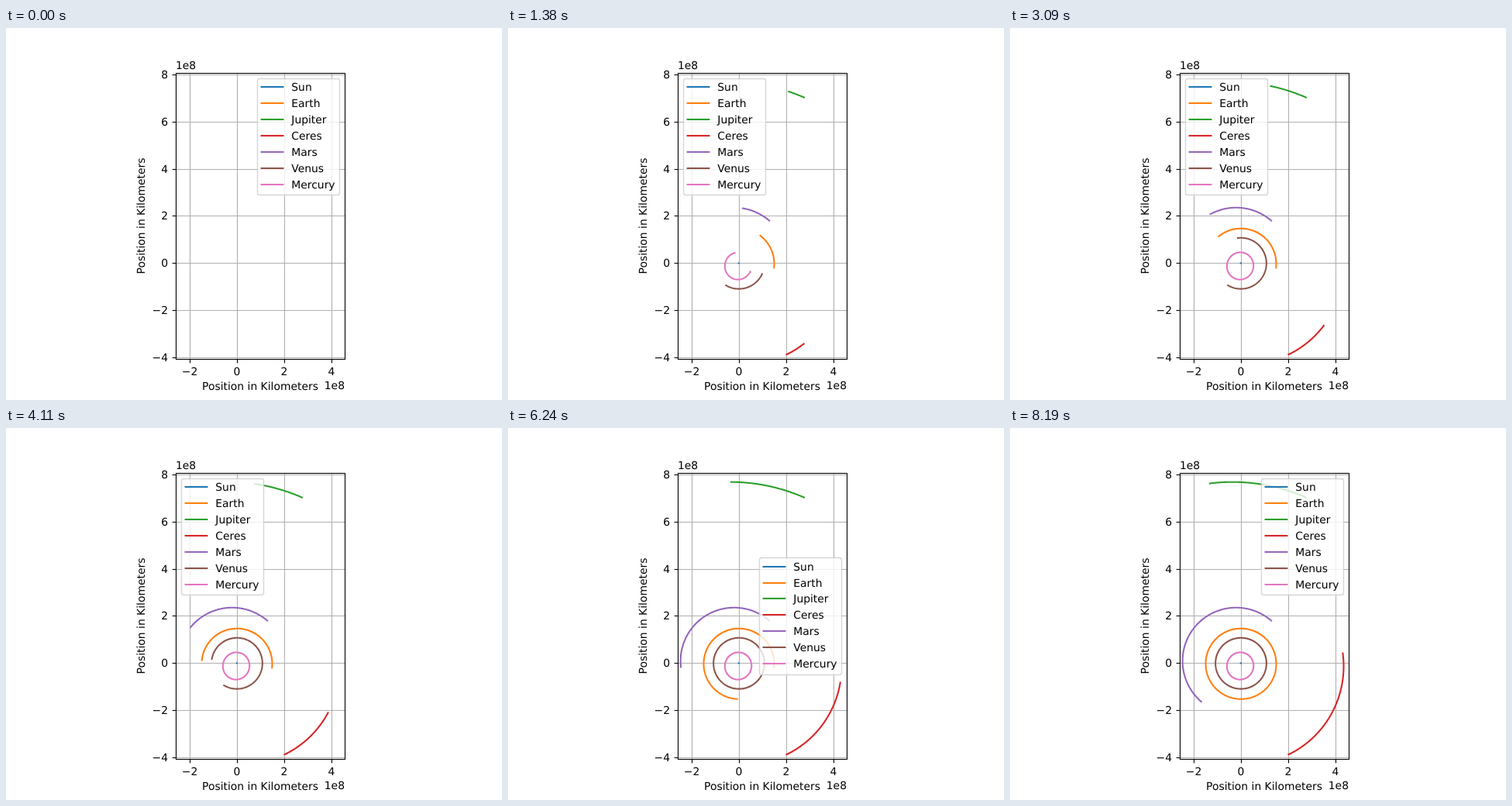
Write an HTML page that moves like this. It is 640 px wide and 480 px high and loops after 8220 ms.

```html
<!DOCTYPE html>
<html lang="en">
<head>
<meta charset="utf-8">
<title>Planet orbits</title>
<style>
  html, body { margin: 0; width: 100%; height: 100%; overflow: hidden; background: #fff; }
  svg { display: block; }
  text { font: 13.89px "DejaVu Sans", sans-serif; fill: #000; text-rendering: geometricPrecision; }
  .grid { stroke: #b0b0b0; stroke-width: 1.11; }
  .axis { stroke: #000; stroke-width: 1.11; fill: none; }
  .trace { fill: none; stroke-width: 2.083; stroke-linecap: square; stroke-linejoin: round; }
</style>
</head>
<body>
<svg id="stage" width="640" height="480" viewBox="0 0 640 480"></svg>
<script>
const STEP_MS = 30, STEPS = 274, DAYS_PER_STEP = 1.335;
const SCALE = 30.44, X0 = 298.1, Y0 = 303.3;   // pixels per 1e8 km, zero point
const AU = 1.495979;                           // in 1e8 km
const BOX = { left: 219.5, right: 437.5, top: 58.5, bottom: 427.5 };
const RAD = Math.PI / 180;

// Angles in degrees: inclination, node, perihelion longitude, mean longitude at start, daily motion.
const BODIES = [
  { name: "Sun", color: "#1f77b4", first: 45 },
  { name: "Earth", color: "#ff7f0e", orbit: [1, 0.0167, 0, 0, 102.94, 354.4, 0.985609] },
  { name: "Jupiter", color: "#2ca02c", orbit: [5.2045, 0.0484, 1.304, 100.47, 14.73, 64.13, 0.0830853] },
  { name: "Ceres", color: "#d62728", orbit: [2.7672, 0.0789, 10.587, 80.25, 153.67, 292.58, 0.21411] },
  { name: "Mars", color: "#9467bd", orbit: [1.52368, 0.0934, 1.85, 49.56, 336.06, 44.05, 0.5240208] },
  { name: "Venus", color: "#8c564b", orbit: [0.72333, 0.00678, 3.395, 76.68, 131.6, 239.12, 1.6021302] },
  { name: "Mercury", color: "#e377c2", orbit: [0.3871, 0.20563, 7.005, 48.33, 77.46, 100.25, 4.0923344] },
];

// Legend corner by step.
const LEGEND = [
  { from: 0, x: 324, top: 64.54 },
  { from: 1, x: 226, top: 64.54 },
  { from: 207, x: 324, top: 167.01 },
  { from: 263, x: 324, top: 64.54 },
];

const stage = document.getElementById("stage");

function add(tag, attrs, parent = stage) {
  const el = document.createElementNS("http://www.w3.org/2000/svg", tag);
  for (const key in attrs) el.setAttribute(key, attrs[key]);
  parent.appendChild(el);
  return el;
}

function label(str, x, y, anchor = "start", extra = {}, parent = stage) {
  add("text", { x, y, "text-anchor": anchor, ...extra }, parent).textContent = str;
}

const line = (cls, x1, y1, x2, y2) => add("line", { class: cls, x1, y1, x2, y2 });

// Heliocentric ecliptic position in 1e8 km.
function helio([a, e, inc, node, peri, mean, rate], day) {
  const M = (mean + rate * day - peri) * RAD;
  let E = M;
  for (let i = 0; i < 8; i++) E -= (E - e * Math.sin(E) - M) / (1 - e * Math.cos(E));
  const px = a * (Math.cos(E) - e);
  const py = a * Math.sqrt(1 - e * e) * Math.sin(E);
  const u = Math.atan2(py, px) + (peri - node) * RAD;
  const r = Math.hypot(px, py) * AU;
  const cn = Math.cos(node * RAD), sn = Math.sin(node * RAD);
  const along = r * Math.cos(u), across = r * Math.sin(u) * Math.cos(inc * RAD);
  return [cn * along - sn * across, sn * along + cn * across];
}

// The Sun's small swing about the centre of mass.
function sunAt(day) {
  const [x, y] = helio(BODIES[2].orbit, day);
  return [-x / 1047 - 0.0071, -y / 1047 + 0.0002];
}

function plot(body, step) {
  const day = step * DAYS_PER_STEP;
  const [sx, sy] = sunAt(day);
  const [x, y] = body.orbit ? helio(body.orbit, day) : [0, 0];
  return (X0 + (x + sx) * SCALE).toFixed(3) + "," + (Y0 - (y + sy) * SCALE).toFixed(3);
}

// Axes
const minus = n => String(n).replace("-", "\u2212");
const xTicks = [-2, 0, 2, 4].map(n => [n, Math.round(X0 + n * SCALE) + 0.5]);
const yTicks = [-4, -2, 0, 2, 4, 6, 8].map(n => [n, Math.round(Y0 - n * SCALE) + 0.5]);
for (const [, x] of xTicks) line("grid", x, BOX.top, x, BOX.bottom);
for (const [, y] of yTicks) line("grid", BOX.left, y, BOX.right, y);

for (const body of BODIES) {
  body.points = Array.from({ length: STEPS }, (_, i) => plot(body, i));
  body.trace = add("polyline", { class: "trace", stroke: body.color });
}

add("rect", {
  class: "axis", x: BOX.left, y: BOX.top,
  width: BOX.right - BOX.left, height: BOX.bottom - BOX.top,
});
for (const [n, x] of xTicks) {
  line("axis", x, BOX.bottom, x, BOX.bottom + 4.9);
  label(minus(n), x - 0.5, 448, "middle");
}
for (const [n, y] of yTicks) {
  line("axis", BOX.left - 4.9, y, BOX.left, y);
  label(minus(n), 209, y + 4.5, "end");
}
label("1e8", 219, 53);
label("1e8", 437, 466, "end");
label("Position in Kilometers", 328, 467, "middle");
label("Position in Kilometers", 0, 0, "middle", { transform: "translate(179 242.5) rotate(-90)" });

// One legend per place, shown in turn
for (const place of LEGEND) {
  const { x, top } = place;
  const y = Math.round(top);
  place.group = add("g", { visibility: "hidden" });
  add("rect", {
    x: x + 0.5, y: y + 0.5, width: 106, height: Math.round(top + 150.8) - y, rx: 2.8,
    fill: "#fff", "fill-opacity": 0.8, stroke: "#ccc", "stroke-opacity": 0.8, "stroke-width": 1.39,
  }, place.group);
  BODIES.forEach((body, i) => {
    const row = Math.round(top + 11.56 + 20.944 * i);
    add("line", {
      class: "trace", stroke: body.color, x1: x + 5.6, y1: row, x2: x + 33.4, y2: row,
    }, place.group);
    label(body.name, x + 44.3, row + 5, "start", {}, place.group);
  });
}

let shown = -1;

function draw(step) {
  if (step === shown) return;
  shown = step;
  for (const { trace, points, first = 2 } of BODIES) {
    trace.setAttribute("points", step < first ? "" : points.slice(0, step).join(" "));
  }
  const active = LEGEND.filter(p => step >= p.from).pop();
  for (const p of LEGEND) p.group.setAttribute("visibility", p === active ? "visible" : "hidden");
}

const start = performance.now();
function tick() {
  const t = Math.max(0, performance.now() - start);
  draw(Math.floor(t / STEP_MS) % STEPS);
  requestAnimationFrame(tick);
}
draw(0);
requestAnimationFrame(tick);
</script>
</body>
</html>
```
